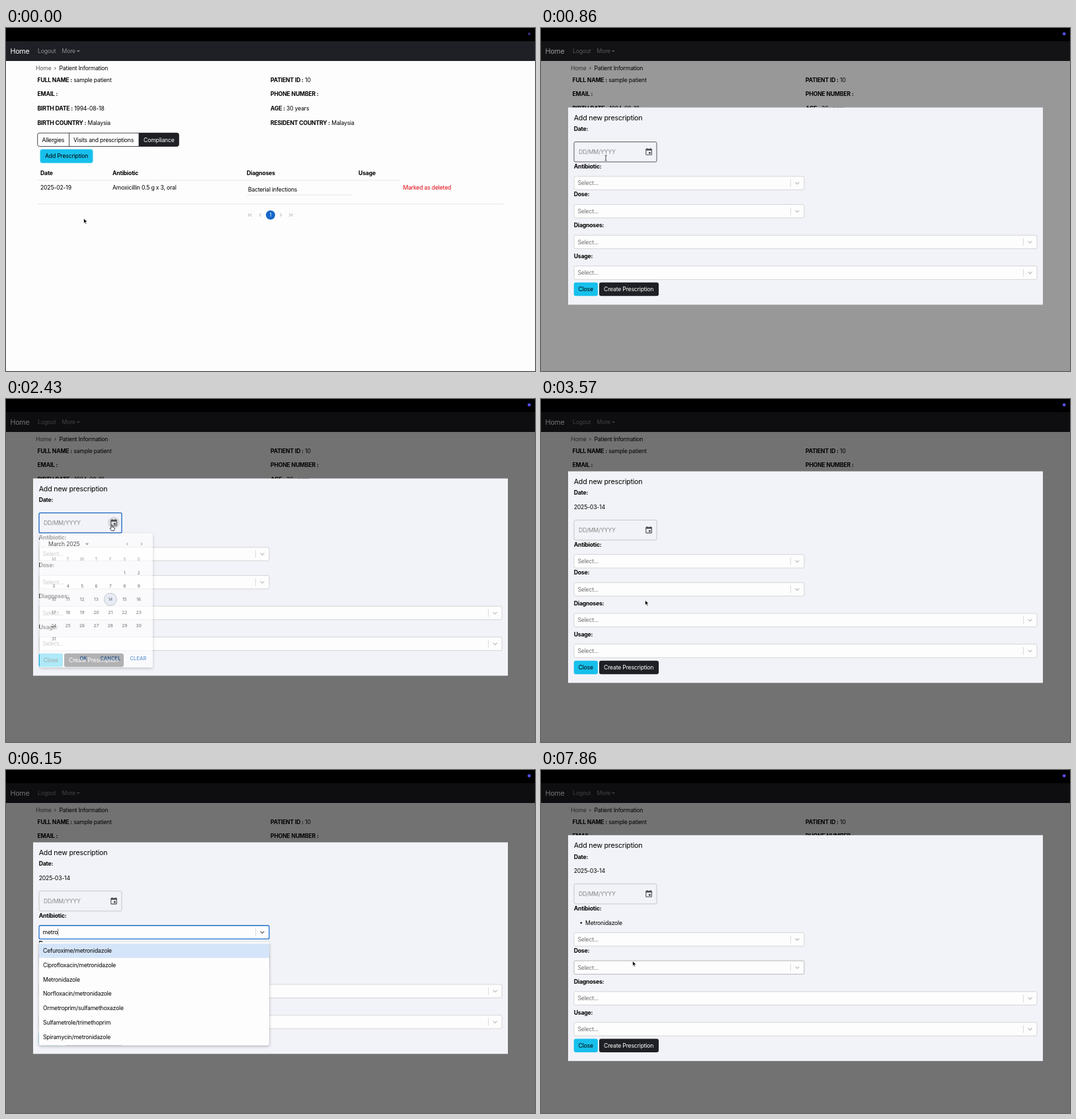
Animation of 800x520 px, one loop 8 s. Source, as an HTML page:

```html
<!DOCTYPE html>
<html lang="en">
<head>
<meta charset="utf-8">
<title>Add prescription</title>
<style>
  html, body { margin: 0; width: 100%; height: 100%; overflow: hidden; background: #fdfdfd; }
  svg { display: block; width: 800px; height: 520px; font: 8.67px Inter, Roboto, sans-serif; letter-spacing: -.022em; }
  text { white-space: pre; }
</style>
</head>
<body>
<svg id="stage" viewBox="0 0 800 520"></svg>
<script>
const LOOP = 8000, FPS = 7, ROW = 21.7, ITEM = 21.75;
const DARK = '#1f2025', CYAN = '#17c0ec', BLUE = '#1764c0', GREY = '#707070';
const stage = document.getElementById('stage');

// Drawing helpers
const text = (x, y, s, attrs = '') => `<text x="${x}" y="${y}" ${attrs}>${s}</text>`;
const bold = (x, y, s, attrs = '') => text(x, y, s, 'font-weight="700" ' + attrs);
const rect = (x, y, w, h, fill, attrs = '') =>
  `<rect x="${x}" y="${y}" width="${w}" height="${h}" fill="${fill}" ${attrs}/>`;
const path = (d, attrs) => `<path d="${d}" ${attrs}/>`;
const line = (x1, x2, y, color = '#dcdee2') => path(`M${x1} ${y}H${x2}`, `stroke="${color}" stroke-width=".7"`);
const stroke = (color, w = .8) => `fill="none" stroke="${color}" stroke-width="${w}"`;
const circle = (x, y, r, attrs) => `<circle cx="${x}" cy="${y}" r="${r}" ${attrs}/>`;
const pair = (x, y, label, value = '') =>
  text(x, y, `<tspan font-weight="700">${label} :</tspan> ${value}`);
const chevron = (x, y, dir, color) => path(`M${x - dir} ${y - 2.2}l${2 * dir} 2.2 ${-2 * dir} 2.2`, stroke(color, .9));

const DRUGS = ['Acetylmidecamycin', 'Azithromycin/fluconazole/secnidazole', 'Amikacin/fosfomycin',
  'Aldesulfone sodium', '4-aminosalicylic acid', 'Amphotericin B', 'Amoxicillin/clavulanic acid',
  'Amphotericin B (oral)', 'Cefmenoxime', 'Cefmetazole', 'Cefuroxime/metronidazole',
  'Ciprofloxacin/metronidazole', 'Clometocillin', 'Meticillin', 'Metronidazole',
  'Norfloxacin/metronidazole', 'Ormetroprim/sulfamethoxazole', 'Sulfametrole/trimethoprim',
  'Spiramycin/metronidazole'];

// Pointer path: tick, x, y
const MOVES = [[0, 117.5, 288.5], [4, 98, 197], [8, 98, 197], [13, 160, 191], [18, 160, 191],
  [23, 157.5, 305], [25, 157.5, 305], [30, 177.5, 240.5], [44, 177.5, 240.5],
  [47, 100, 316], [48, 100, 316], [54, 138.5, 289.5], [56, 138.5, 289.5]];

function pointerAt(n) {
  const i = MOVES.findIndex(m => m[0] > n);
  const [t0, x0, y0] = MOVES[i - 1], [t1, x1, y1] = MOVES[i];
  const k = (n - t0) / (t1 - t0);
  return { x: x0 + (x1 - x0) * k, y: y0 + (y1 - y0) * k };
}

function pointer(n, { x, y }) {
  if (n >= 37 && n < 44) return '';
  const hand = (n > 2 && n < 6) || (n > 10 && n < 25);
  const beam = n > 5 && n < 11;
  const at = `transform="translate(${x} ${y})" `;
  const ink = at + 'fill="#000" stroke="#fff" stroke-width=".7" stroke-linejoin="round"';
  if (beam) return path('M-1.6-4Q0-4 0-3Q0-4 1.6-4M0-3V3M-1.6 4Q0 4 0 3Q0 4 1.6 4', at + stroke('#222', .8));
  if (hand) return path('M-.9.6Q0-.6.9.6V3.2L3.6 3.8Q4.6 4.2 4.2 6L3.4 8.6H-.6L-3 5.2Q-2.6 4-1 5.2Z',
    at + 'fill="#fff" stroke="#111" stroke-width=".8"');
  return path('M0 0V7.6L1.7 6 2.9 8.7 4.2 8.1 3 5.5H5.4Z', ink);
}

function navBar() {
  return rect(0, 20, 800, 30, DARK)
    + text(6.5, 38.8, 'Home', 'font-size="10.6" fill="#fff"')
    + text(48, 38.1, 'Logout', 'fill="#8f9094"') + text(84.5, 38.1, 'More', 'fill="#8f9094"')
    + path('M107 34h4.8l-2.4 2.4z', 'fill="#8f9094"');
}

function pager() {
  const c = '#999', y = 283.5;
  return path(`M367.3 ${y - 2.3}v4.6M432.6 ${y - 2.3}v4.6`, stroke(c))
    + chevron(370.5, y, -1, c) + chevron(384.5, y, -1, c)
    + chevron(415.5, y, 1, c) + chevron(429.5, y, 1, c)
    + circle(400, y, 7, 'fill="#1668c8"')
    + text(400, 286, '1', 'font-size="7" fill="#fff" text-anchor="middle"');
}

function page(hover) {
  const y = i => 81.6 + i * ROW;
  return rect(0, 0, 800, 520, '#fdfdfd') + navBar()
    + text(45, 64.1, 'Home', 'fill="#555"') + text(72.7, 63.8, '›', 'fill="#444"')
    + text(80.5, 64.1, 'Patient Information')
    + pair(47.5, y(0), 'FULL NAME', 'sample patient') + pair(400, y(0), 'PATIENT ID', '10')
    + pair(47.5, y(1), 'EMAIL') + pair(400, y(1), 'PHONE NUMBER')
    + pair(47.5, y(2), 'BIRTH DATE', '1994-08-18') + pair(400, y(2), 'AGE', '30 years')
    + pair(47.5, y(3), 'BIRTH COUNTRY', 'Malaysia') + pair(400, y(3), 'RESIDENT COUNTRY', 'Malaysia')
    + path('M201 159h57.5q3 0 3 3v14.5q0 3-3 3H201z', `fill="${DARK}"`)
    + rect(47.7, 159.2, 213.6, 20.3, 'none', `rx="3" stroke="${DARK}" stroke-width=".8"`)
    + path('M95.5 159v20.5M201 159v20.5', stroke(DARK))
    + text(54.5, 172.5, 'Allergies') + text(102, 172.5, 'Visits and prescriptions')
    + text(208, 172.5, 'Compliance', 'fill="#fff"')
    + rect(51.8, 184, 79.4, 20.6, hover ? '#31d0f2' : CYAN, 'rx="3" stroke="#3fcdf0" stroke-width=".6"')
    + text(59, 197.4, 'Add Prescription')
    + bold(52, 223, 'Date') + bold(161, 223, 'Antibiotic')
    + bold(364, 223, 'Diagnoses') + bold(533, 223, 'Usage')
    + line(47.5, 596, 231)
    + text(52, 245.3, '2025-02-19') + text(161, 245.3, 'Amoxicillin 0.5 g x 3, oral')
    + text(366, 247.5, 'Bacterial infections') + line(364, 524, 253.3)
    + text(600.5, 245.2, 'Marked as deleted', 'fill="#dc0510"')
    + line(47.5, 752, 266.6) + pager();
}

function select(y, right, { focus, hover, value = '' } = {}) {
  const mid = y + 10.2, color = focus ? '#1f70cc' : hover ? '#a9a9a9' : '#ccc';
  const bar = '<tspan dx="-.8" font-weight="300">|</tspan>';
  const label = value ? text(55.5, y + 13.3, value + bar)
    : text(55.5, y + 13.3, 'Select...', `fill="${GREY}"`) + (focus ? text(55.2, y + 13.3, bar) : '');
  return rect(50, y, right - 50, 20.4, '#fdfdfd', `rx="2" stroke="${color}" stroke-width="${focus ? 1.3 : .8}"`)
    + label
    + path(`M${right - 20.5} ${y + 4.5}v11.5`, stroke('#ccc', .7))
    + path(`M${right - 13.3} ${mid - 1.3}l2.9 2.8 2.9-2.8`, stroke(focus ? '#555' : '#bbb', 1.2));
}

function dateField(y, n) {
  const focus = n > 16 && n < 25, hover = n < 17;
  const color = focus ? BLUE : hover ? '#333' : '#bbb';
  return rect(50, y, 125, 30.3, 'none', `rx="2" stroke="${color}" stroke-width="${focus ? 1.3 : .8}"`)
    + text(57, y + 18.3, 'DD/MM/YYYY', 'fill="#888"')
    + (n > 12 && n < 20 ? circle(163, y + 15, 9, 'fill="#000" opacity=".1"') : '')
    + path('M17 12h-5v5h5zM16 1v2H8V1H6v2H5Q3 3 3 5V19Q3 21 5 21H19Q21 21 21 19V5Q21 3 19 3H18V1zM19 19H5V8H19z',
      `transform="translate(156.6 ${y + 8.8}) scale(.54)" fill="#4c4d50" fill-rule="evenodd"`);
}

function modal(n, typed) {
  const dated = n >= 25, picked = n >= 48;
  const d = dated ? ROW : 0, e = d + (picked ? ROW : 0);
  const h = 299 + e, top = 270 - h / 2, at = dy => top + dy + e;
  const open = n >= 32 && n < 48;
  return rect(41, top, 718, h, '#f2f3f8')
    + text(49.7, top + 19.2, 'Add new prescription', 'font-size="10.65"')
    + bold(49.7, top + 35.8, 'Date:')
    + (dated ? text(49.7, top + 57.5, '2025-03-14') : '')
    + dateField(top + 52.2 + d, n)
    + bold(49.7, top + 92.6 + d, 'Antibiotic:')
    + (picked ? circle(60.7, top + 111.2 + d, 1.3, '') + text(67, top + 114.2 + d, 'Metronidazole') : '')
    + select(at(104.4), 398, { focus: open, hover: n > 28 && n < 32, value: typed })
    + bold(49.7, at(134.8), 'Dose:')
    + select(at(147), 398, { hover: n > 51 })
    + bold(49.7, at(181.5), 'Diagnoses:') + select(at(193.7), 750)
    + bold(49.7, at(228.4), 'Usage:') + select(at(240.4), 750)
    + rect(49.7, at(265.3), 36.2, 20.5, CYAN, 'rx="3"') + text(56.5, at(278.7), 'Close')
    + rect(88, at(265.3), 90, 20.5, DARK, 'rx="3"') + text(95, at(278.7), 'Create Prescription', 'fill="#fff"');
}

function calendar(n) {
  const col = i => 72.3 + 21.4 * i;
  const small = 'font-size="6.6" letter-spacing="0" text-anchor="middle" ';
  const button = (x, s) => text(x, 396.3, s,
    `font-size="7.5" letter-spacing=".1" font-weight="500" text-anchor="middle" fill="${BLUE}"`);
  const chosen = n > 23;
  let out = rect(51, 203.5, 171, 203.5, '#fff', 'rx="2" filter="url(#shadow)"')
    + text(64, 222.9, 'March 2025') + path('M119.8 218.8h5.4l-2.7 2.7z', 'fill="#666"')
    + chevron(183.5, 219.8, -1.2, '#555') + chevron(205, 219.8, 1.2, '#555')
    + [...'MTWTFSS'].map((s, i) => text(col(i), 244.9, s, small + 'fill="#777"')).join('')
    + circle(col(4), 303.8, 9.4, chosen ? `fill="${BLUE}"` : 'fill="#e3e9f6" stroke="#777" stroke-width=".6"');
  for (let day = 1; day <= 31; day++) {
    const cell = day + 4;
    out += text(col(cell % 7), 266.2 + 20 * Math.floor(cell / 7), day,
      small + (chosen && day === 14 ? 'fill="#fff"' : 'fill="#222"'));
  }
  out += button(117, 'OK') + button(158, 'CANCEL') + button(200, 'CLEAR');
  return `<g opacity="${n === 17 ? .65 : 1}">${out}</g>`;
}

function menu(typed, y) {
  const items = DRUGS.filter(s => s.toLowerCase().includes(typed));
  const h = Math.min(items.length * ITEM + 4, 162.7);
  const active = Math.max(0, Math.floor((y - 263) / ITEM));
  return rect(50, 261, 348, h, '#fdfdfd', 'rx="2" filter="url(#shadow)"')
    + `<clipPath id="list"><rect x="50" y="261" width="348" height="${h}"/></clipPath><g clip-path="url(#list)">`
    + rect(50, 263.2 + active * ITEM, 348, ITEM, '#d5e5f9')
    + items.slice(0, 8).map((s, i) => text(56, 277 + i * ITEM, s)).join('') + '</g>';
}

function draw(n) {
  const p = pointerAt(n);
  const typed = 'metro'.slice(0, [37, 39, 41, 42, 43].filter(k => n >= k).length);
  let out = `<defs><filter id="shadow" x="-10%" y="-10%" width="120%" height="120%">
    <feDropShadow dx="0" dy="1.5" stdDeviation="2" flood-opacity=".3"/></filter></defs>`
    + page(n > 2 && n < 6);
  if (n >= 6) {
    out += rect(0, 20, 800, 500, '#000', `opacity="${n === 6 ? .4 : .55}"`)
      + modal(n, n < 48 ? typed : '');
  }
  if (n >= 17 && n < 25) out += calendar(n);
  if (n >= 32 && n < 48) out += menu(typed, p.y);
  out += rect(0, 0, 800, 20, '#000')
    + circle(791.2, 8.8, n ? 2.4 : 1.9, `fill="${n ? '#5650ee' : '#39348f'}"`)
    + pointer(n, p);
  stage.innerHTML = out;
}

const start = performance.now();
let shown = -1;
function frame() {
  const t = (performance.now() - start) % LOOP;
  const n = Math.min(55, Math.floor(t * FPS / 1000 + .02));
  if (n !== shown) draw(shown = n);
  requestAnimationFrame(frame);
}
frame();
</script>
</body>
</html>
```
